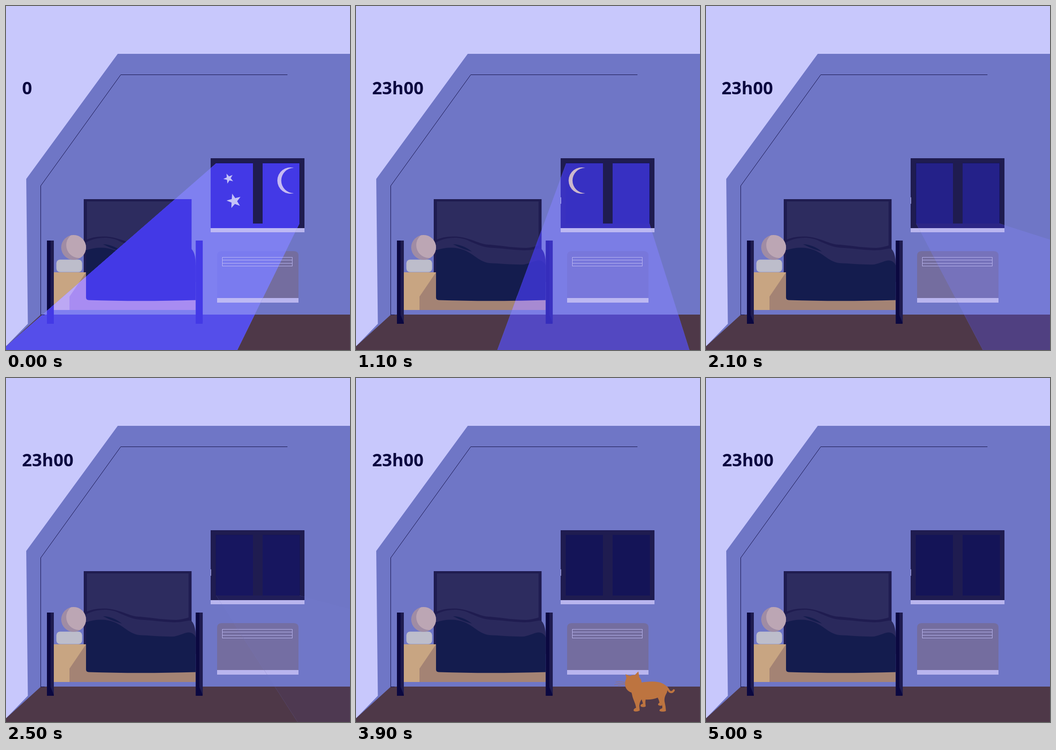
Recreate the animation shown at these times as an HTML page with a canvas. Size 748 px wide and 748 px high, loop 5100 ms.

```html
<!DOCTYPE html>
<html lang="en">
<head>
<meta charset="utf-8">
<title>Night room</title>
<style>
html, body { margin: 0; width: 100%; height: 100%; overflow: hidden; background: #c8c8fc; }
canvas { display: block; width: 100%; height: 100%; }
</style>
</head>
<body>
<canvas id="stage" width="748" height="748"></canvas>
<script>
const ctx = document.getElementById('stage').getContext('2d');
const LOOP = 5100;

// Each surface: colour in the dark, colour in full light.
const GLOW = '#4339e6';
const COLORS = {
  wall: ['#6f76c6', '#7f80f0'],
  floor: ['#4e3848', '#554eea'],
  frame: ['#1f1c50', GLOW],
  board: ['#2d2c5f', GLOW],
  post: ['#0b0840', GLOW],
  blanket: ['#141c4e', GLOW],
  fold: ['#2a295c', GLOW],
  pane: ['#141457', GLOW],
  wood: ['#c8a582', '#bca8f4'],
  shade: ['#a48374', '#a88cf2'],
  heater: ['#746d9f', '#7a7bef'],
  trim: ['#b9b5ee', '#bdb9f4'],
  moon: ['#dcb45a', '#c6baf2'],
  star: ['#b0aee4', '#c4c2f8'],
  ball: ['#a08ca4', '#a08ca4'],
  ballLit: ['#bca6b4', '#bca6b4'],
  pillow: ['#bdbdcb', '#bdbdcb']
};

// Values at the end points of the successive moves.
const TRACKS = {
  beamL: [-9, 118, 498, 602, 640, 640, 640, 640, 640],
  beamR: [503, 591, 860, 1502, 1700, 1700, 1700, 1700, 1700],
  light: [1, 0.5, 1, 0.35, 0, 0, 0, 0, 0],
  textX: [0, 0, 0, -1.2, 0, 0, 0, 0, 0],
  moonX: [0, -56, -200, -200, -200, -200, -200, -200, -200],
  starX: [0, -1, -2, -2, -2, -2, -2, -2, -2],
  catX: [755, 755, 755, 755, 755, 688, 562, 342, 202],
  catY: [651, 651, 651, 651, 651, 651, 638, 541, 430],
  catSize: [1, 1, 1, 1, 1, 1, 1, 1.57, 1.9],
  catAlpha: [0, 0, 0, 0, 0, 1, 1, 1, -0.05]
};
const SLOW_STEPS = [0, 0.11, 0.25, 0.55, 1];
const CLOCK = '23h00';

const easeOut = p => 1 - Math.pow(1 - p, 1.7);

function stateAt(t) {
  let move = 0, e;
  if (t < 1000) {
    e = SLOW_STEPS[Math.floor(t / 200)];
  } else {
    const step = Math.floor((t - 1000) / 100);
    move = 1 + Math.floor(step / 6);
    e = easeOut((step % 6 + 1) / 6);
  }
  const state = {};
  for (const key in TRACKS) {
    const v = TRACKS[key];
    state[key] = v[move] + (v[move + 1] - v[move]) * e;
  }
  state.label = CLOCK.slice(-Math.min(5, Math.floor(t / 200) + 1));
  return state;
}

function mix(a, b, k) {
  const part = (s, i) => parseInt(s.substr(1 + i * 2, 2), 16);
  const rgb = [0, 1, 2].map(i => Math.round(part(a, i) + (part(b, i) - part(a, i)) * k));
  return `rgb(${rgb})`;
}

function poly(...pts) {
  ctx.beginPath();
  for (let i = 0; i < pts.length; i += 2) ctx.lineTo(pts[i], pts[i + 1]);
  ctx.closePath();
}

function fillPath(d, color) {
  ctx.fillStyle = color;
  ctx.fill(new Path2D(d));
}

function disc(x, y, r) {
  ctx.beginPath();
  ctx.arc(x, y, r, 0, Math.PI * 2);
}

function star(x, y, r, turn) {
  ctx.beginPath();
  for (let i = 0; i < 10; i++) {
    const a = turn + i * Math.PI / 5, d = i % 2 ? r * 0.4 : r;
    ctx.lineTo(x + d * Math.cos(a), y + d * Math.sin(a));
  }
  ctx.fill();
}

function drawSky(s, col) {
  ctx.save();
  ctx.beginPath();
  ctx.rect(457, 342, 181, 141);
  ctx.clip();
  ctx.fillStyle = col('star');
  star(484 + s.starX * 32, 375 - s.starX * -4, 11.5, 3.05);
  star(496 + s.starX * 43, 424 - s.starX * -4, 16.5, 3.2);
  ctx.translate(s.moonX, 0);
  fillPath('M626 352A28.5 28.5 0 1 0 626 407A27.5 27.5 0 0 1 626 352Z', col('moon'));
  ctx.restore();
}

function drawWindow(s, col, box) {
  box('frame', 445, 331, 204, 152);
  box('pane', 456, 341, 81, 132);
  box('pane', 558, 341, 81, 132);
  drawSky(s, col);
  box('trim', 445, 483, 204, 9);
  if (s.starX <= -0.9) box('star', 445, 416, 1, 14);
}

function drawHeater(col, box) {
  fillPath('M459 645V543Q459 533 469 533H626Q636 533 636 543V645Z', col('heater'));
  box('trim', 459, 635, 177, 10);
  ctx.strokeStyle = col('trim');
  ctx.lineWidth = 1;
  ctx.strokeRect(470.5, 546.5, 152, 19);
  for (const y of [552.5, 559.5]) {
    ctx.beginPath();
    ctx.moveTo(471, y);
    ctx.lineTo(623, y);
    ctx.stroke();
  }
}

function drawPost(x, col, box) {
  box('post', x, 510, 15, 181);
  poly(x + 8, 510, x + 15, 510, x + 15, 689, x + 8, 672);
  ctx.fillStyle = col('frame');
  ctx.fill();
}

function drawBed(col, box) {
  box('frame', 169, 420, 234.5, 180);
  box('board', 176, 425, 221, 175);

  box('wood', 104, 579, 70, 82);
  fillPath('M174 579L138 632V661H412.5V630H174Z', col('shade'));

  fillPath('M174 509C190 500 222 498 246 507C266 513 274 519 292 519C322 522 345 526 370 526C386 525 396 520 403 520V540H174Z', col('frame'));
  fillPath('M174 514C194 503 224 500 246 511C268 520 276 525 300 526C330 528 352 532 374 531C388 530 396 526 403 528C410 535 412 546 412.5 560V600H174Z', col('fold'));
  fillPath('M174 531C190 526 206 524 222 527C252 532 264 556 290 559C316 560 344 563 366 562C382 559 392 551 402 554C408 556 411 560 412.5 564V639.5Q290 643 180 639.5Q174 639 174 634Z', col('blanket'));
  fillPath('M211 518C224 518 240 524 252 534C238 530 226 526 211 518Z', col('blanket'));

  ctx.fillStyle = col('pillow');
  ctx.beginPath();
  ctx.roundRect(109.5, 551.5, 56, 27, 8);
  ctx.fill();

  ctx.save();
  disc(147, 525, 27);
  ctx.fillStyle = col('ball');
  ctx.fill();
  ctx.clip();
  disc(159, 520, 28);
  ctx.fillStyle = col('ballLit');
  ctx.fill();
  ctx.restore();

  drawPost(89, col, box);
  drawPost(412.5, col, box);
}

function drawRoom(s, light) {
  const col = name => mix(...COLORS[name], light);
  const box = (name, x, y, w, h) => {
    ctx.fillStyle = col(name);
    ctx.fillRect(x, y, w, h);
  };
  poly(243, 104, 748, 104, 748, 748, 0, 748, 0, 740, 47.5, 691, 44, 376);
  ctx.fillStyle = col('wall');
  ctx.fill();
  poly(76, 671, 748, 671, 748, 748, 0, 748, 0, 740);
  ctx.fillStyle = col('floor');
  ctx.fill();

  ctx.strokeStyle = '#15124a';
  ctx.lineWidth = 1;
  ctx.beginPath();
  ctx.moveTo(84, 671.5);
  ctx.lineTo(75.5, 671.5);
  ctx.lineTo(75.5, 391);
  ctx.lineTo(249.5, 149.5);
  ctx.lineTo(612, 149.5);
  ctx.stroke();

  drawWindow(s, col, box);
  drawHeater(col, box);
  drawBed(col, box);
}

function drawBeam(s) {
  if (s.light <= 0.005) return;
  const pts = [457, 342, 638, 342, 638, 473, s.beamR, 748, s.beamL, 748];
  if (s.beamL > 457) pts.push(457, 473);
  ctx.save();
  poly(...pts);
  ctx.clip();
  drawRoom(s, s.light);
  ctx.restore();
  ctx.fillStyle = COLORS.frame[0];
  ctx.fillRect(537, 342, 21, 131);
}

function drawCat(s) {
  if (s.catAlpha <= 0) return;
  const fur = '#bd7440';
  ctx.save();
  ctx.globalAlpha = s.catAlpha;
  ctx.translate(s.catX, s.catY);
  ctx.scale(s.catSize, s.catSize);

  // head, back, hind leg, belly and front leg in one outline
  fillPath('M24 6L34 10Q40 7 44 8L52 0L54 13Q59 18 59 24C72 22 92 20 104 26C114 30 117 38 114 46C110 53 108 58 109 66L111 76L112 86Q105 89 98 86Q97 82 104 80L104 72C99 66 96 62 94 57C82 62 70 62 60 60C56 64 54 70 54 76L55 85Q47 89 42 86Q40 82 47 79C46 70 41 62 39 54Q38 49 37 46C28 43 23 36 23 27Q23 20 26 15Z', fur);
  // far legs
  fillPath('M58 57L69 57Q66 64 68 76Q63 79 57 76Q55 72 62 70Z', fur);
  fillPath('M94 53L104 56Q101 62 104 74Q99 76 95 73Q94 70 98 68Z', fur);

  ctx.strokeStyle = fur;
  ctx.lineCap = 'round';
  ctx.lineWidth = 4.5;
  ctx.stroke(new Path2D('M109 32C119 36 116 45 123 45Q127 45 129 41'));

  ctx.strokeStyle = '#a8705c';
  ctx.lineWidth = 0.8;
  ctx.stroke(new Path2D('M24 24Q14 21 3 23M24 26Q12 25 0 29M24 28Q16 28 8 31'));
  ctx.restore();
}

function drawLabel(s) {
  ctx.fillStyle = '#0b0840';
  ctx.font = 'bold 38px "Noto Sans", "Open Sans", sans-serif';
  ctx.fillText(s.label, 35 + s.textX, 192);
}

function render(t) {
  const s = stateAt(t);
  ctx.fillStyle = '#c8c8fc';
  ctx.fillRect(0, 0, 748, 748);
  drawRoom(s, 0);
  drawBeam(s);
  drawLabel(s);
  drawCat(s);
}

const start = performance.now();
function tick() {
  render((performance.now() - start) % LOOP);
  requestAnimationFrame(tick);
}
tick();
</script>
</body>
</html>
```
